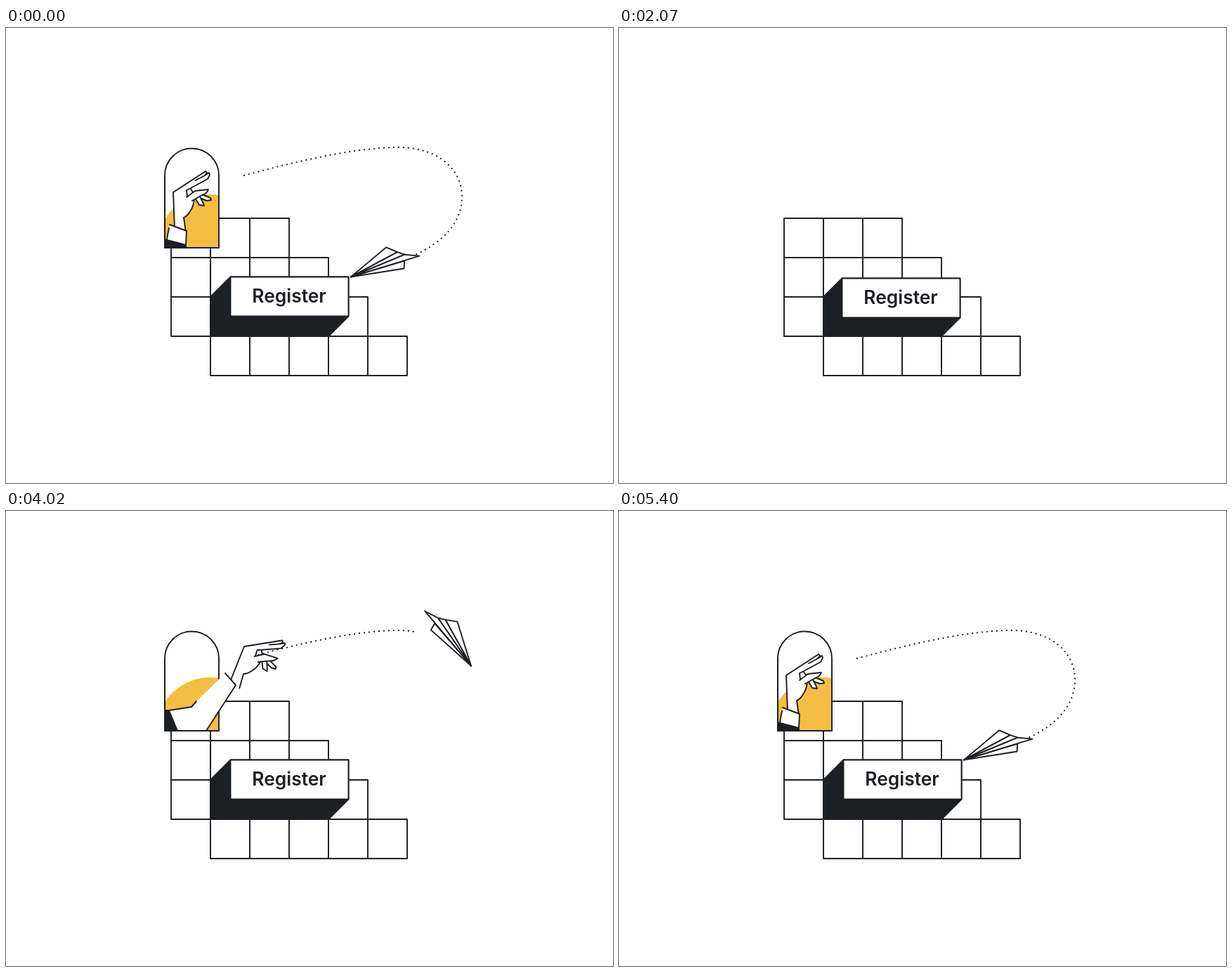
Animation, 864 px wide and 648 px high, one loop 5430 ms. Source, as an HTML page:

```html
<!DOCTYPE html>
<html lang="en">
<head>
<meta charset="utf-8">
<title>Register</title>
<style>
html, body { margin: 0; width: 100%; height: 100%; overflow: hidden; background: #fff; }
svg { display: block; width: 864px; height: 648px; }
.line { fill: #fff; stroke: #1c1f23; stroke-width: 1.9; stroke-linejoin: round; stroke-linecap: round; }
.line * { vector-effect: non-scaling-stroke; }
.bare { fill: none; }
.dark { fill: #1c1f23; }
text { font: 600 26.4px Inter, "Open Sans", sans-serif; text-anchor: middle; }
</style>
</head>
<body>
<svg viewBox="0 0 864 648">
  <defs>
    <clipPath id="inside"><path id="insideShape"/></clipPath>
    <clipPath id="reach"><path id="reachShape"/></clipPath>
  </defs>
  <g id="grid" class="line"></g>
  <g id="button">
    <path id="side" class="line dark"/>
    <g id="face">
      <rect id="front" class="line" x="291" y="383" width="168" height="56"/>
      <text id="label" x="374.6" y="419">Register</text>
    </g>
  </g>
  <g id="trail" class="dark"></g>
  <g id="scene">
    <g class="line">
      <path id="pane" stroke="none"/>
      <g clip-path="url(#inside)"><circle id="sun" cx="291" r="78" fill="#f5be42" stroke="none"/></g>
      <path id="frame" class="bare"/>
    </g>
    <g class="line" clip-path="url(#reach)">
      <g class="hand">
        <path d="M274 235L291 242L292 245L286 246L270 240Z"/>
        <path d="M268 240L275 252L282 253L281 250L276 240Z"/>
        <path d="M240 285L238 234L284 204L286 206L283 210L289 206L290 209L287 215L263 228L257 231L258 240L268 243Q267 255 262 261Q258 268 253 270L256 291"/>
        <path class="bare" d="M283 210L270 217M263 229L266 234"/>
      </g>
      <path id="coat" class="dark"/>
      <path id="sleeve"/>
    </g>
    <g id="planeClip" class="line">
      <g id="plane">
        <path d="M0 0L-71 29L-77 20Z"/>
        <path d="M0 0L-65 -10L-75 4Z"/>
        <path d="M0 0L-75 4L-82 12.5Z"/>
        <path d="M0 0L-82 12.5L-99 25Z"/>
      </g>
    </g>
    <g class="line" clip-path="url(#reach)">
      <g class="hand"><path d="M257 241L269 232L288 230Q286 236 279 238L265 246"/></g>
    </g>
    <path id="edge" class="line bare"/>
  </g>
</svg>
<script>
const LOOP = 5430, CUT = 969, BUTTON_IN = 1770, WINDOW_IN = 2500, RELEASE = 3640, LANDED = 5400;
const CELL = 56, DEPTH = 28.5;
const $ = id => document.getElementById(id);
const clamp = v => Math.min(1, Math.max(0, v));
const span = (t, a, b) => clamp((t - a) / (b - a));
const smooth = (t, a, b) => { const u = span(t, a, b); return u * u * (3 - 2 * u); };
const mix = (a, b, k) => a + (b - a) * k;
const blend = (p, q, k) => p.map((v, i) => mix(v, q[i], k));
const set = (id, attr, v) => $(id).setAttribute(attr, v);
const show = (el, on) => { el.style.display = on ? '' : 'none'; };
const poly = pts => 'M' + pts.map(p => p.join(' ')).join('L');

function rotate([x, y], deg) {
  const a = deg * Math.PI / 180, c = Math.cos(a), s = Math.sin(a);
  return [x * c - y * s, x * s + y * c];
}

function add(parent, tag, attrs) {
  const el = document.createElementNS('http://www.w3.org/2000/svg', tag);
  for (const k in attrs) el.setAttribute(k, attrs[k]);
  return parent.appendChild(el);
}

// Share of the way still to go on cubic-bezier(.17, 0, 0, 1).
function remaining(x) {
  if (x <= 0) return 1;
  if (x >= 1) return 0;
  let lo = 0, hi = 1;
  for (let i = 0; i < 24; i++) {
    const u = (lo + hi) / 2;
    if (0.51 * u * (1 - u) ** 2 + u ** 3 < x) lo = u; else hi = u;
  }
  return 1 - lo * lo * (3 - 2 * lo);
}

// Hand poses: knuckle x, y, turn.
const LOW = [172, 415, 12], HOLD = [242, 237, -9], THROWN = [339, 193, 24], REST = [238, 234, 0];

// Sleeve outline at rest (moves with the hand) and with the arm stretched out.
const sleeveRest = [[233, 280], [257, 289], [256, 309], [245, 306], [229, 302], [230, 295], [232, 285]];
const sleeveOut = [[312, 231], [327, 248], [285, 313], [244, 313], [232, 284], [264, 279], [271, 271]];

const cells = [];
[3, 4, 5, 5].forEach((count, row) => {
  const x = row === 3 ? 291 : 235, slide = [24, 18, 15, 21][row];
  for (let i = 0; i < count; i++)
    cells.push({ slide, el: add($('grid'), 'rect', { x: x + i * CELL, y: 271 + row * CELL, width: CELL, height: CELL }) });
});

const curve = document.createElementNS('http://www.w3.org/2000/svg', 'path');
curve.setAttribute('d', 'M339 210C420 188 500 170 560 170C620 171 649 205 649 240C649 280 618 308 578 325');
const curveLength = curve.getTotalLength();
const along = k => { const p = curve.getPointAtLength(curveLength * k); return [p.x, p.y]; };
const dotCount = Math.round(curveLength / 7), dots = [];
for (let i = 0; i <= dotCount; i++) {
  const [cx, cy] = along(i / dotCount);
  dots.push(add($('trail'), 'circle', { cx, cy, r: 1.15 }));
}

function drawGrid(t, slide) {
  cells.forEach((c, i) => {
    const age = t - CUT - i * 100 / 3, leaving = t < CUT;
    show(c.el, leaving || age >= 0);
    const move = leaving ? [-c.slide * slide, 0] : [0, 36.5 * remaining(age / 500)];
    c.el.setAttribute('transform', `translate(${move})`);
  });
}

function drawButton(t, x) {
  const age = t - BUTTON_IN, leaving = t < CUT;
  show($('button'), leaving || age >= 0);
  const e = leaving ? DEPTH : DEPTH * (1 - Math.exp(-age / 230) * Math.cos(age * Math.PI / 190));
  const l = 291, r = 459, top = 383, b = 439;
  set('button', 'transform', `translate(${x})`);
  set('face', 'transform', `translate(${e} ${-e})`);
  set('side', 'd', poly([[l, top], [l + e, top - e], [r + e, top - e], [r + e, b - e], [r, b], [l, b]]) + 'Z');
  const k = leaving ? span(t, 330, 450) : 0;
  $('front').style.fill = `rgb(${blend([255, 255, 255], [80, 134, 236], k)})`;
  $('label').style.fill = `rgb(${blend([28, 31, 35], [255, 255, 255], k)})`;
}

function drawWindow(T) {
  const k = remaining((T - WINDOW_IN) / 500);
  const top = 171.5 + 82 * k, b = 313 + 38 * k, s = top + 38.5;
  const arch = `M226 ${b}V${s}A38.5 38.5 0 0 1 303 ${s}V${b}Z`;
  for (const id of ['insideShape', 'pane', 'frame']) set(id, 'd', arch);
  set('reachShape', 'd', `M226 ${b}V${s}A38.5 38.5 0 0 1 264.5 ${top}V-99H900V${b}Z`);
  set('edge', 'd', `M303 ${b}H226V${s}`);
  set('sun', 'cy', 315 + 158 * k);
}

function drawArm(T, rise) {
  const reach = smooth(T, 3523, 3763), back = smooth(T, 4600, 5230), out = reach * (1 - back);
  const pose = blend(blend(blend(HOLD, LOW, rise), THROWN, reach), REST, back);
  const [x, y, turn] = pose;
  for (const el of document.querySelectorAll('.hand'))
    el.setAttribute('transform', `translate(${x} ${y}) rotate(${turn}) translate(-238 -234)`);
  const place = p => {
    const [dx, dy] = rotate([p[0] - 238, p[1] - 234], turn);
    return [x + dx, y + dy];
  };
  const pts = sleeveRest.map((p, i) => blend(place(p), sleeveOut[i], out));
  set('sleeve', 'd', poly(pts));
  const shoulder = [[256, 325], [215, 325], [215, 300]].map(place);
  set('coat', 'd', poly([pts[4], pts[3], pts[2],
    ...shoulder.map((p, i) => blend(p, [i ? 215 : 285, i < 2 ? 325 : 284], out))]) + 'Z');
  return pose;
}

// Nose x, y and turn while the plane follows the curve; it rolls over in the bend.
function flight(s, flip) {
  const ahead = Math.min(0.995, s + 0.06);
  const [x0, y0] = along(ahead - 0.005), [x1, y1] = along(ahead + 0.005);
  const heading = Math.atan2(y1 - y0, x1 - x0) * 180 / Math.PI + 5;
  const [x, y] = along(s), [dx, dy] = rotate([92, 0], heading);
  return [x + dx, y + dy, heading + 12.5 * flip + 20 * Math.sin(Math.PI * s)];
}

function drawPlane(T, s, rise, hand) {
  const tilt = 21 * rise, [dx, dy] = rotate([94, -30], tilt);
  const held = [hand[0] + dx, hand[1] + dy, tilt];
  const flip = 1 - 2 * smooth(s, 0.55, 0.76);
  const [x, y, turn] = blend(held, flight(s, flip), smooth(T, RELEASE - 20, RELEASE + 120));
  set('plane', 'transform', `translate(${x} ${y}) rotate(${turn}) scale(1 ${flip})`);
  set('planeClip', 'clip-path', T < RELEASE ? 'url(#reach)' : 'none');
}

function drawTrail(from, to) {
  dots.forEach((d, i) => show(d, to > 0 && i / dotCount <= to && i / dotCount >= from));
}

function draw(t) {
  const leaving = t < CUT, T = leaving ? LOOP : t;
  const slide = leaving ? (Math.max(0, t - 540) / 270) ** 4 : 0;
  const shift = -14.8 * slide;
  const s = 1 - (1 - span(T, RELEASE, LANDED)) ** 3.1;
  const rise = remaining((T - WINDOW_IN) / 900);
  for (const id of ['grid', 'button', 'scene']) $(id).style.opacity = leaving ? 1 - span(t, 860, 960) : 1;
  drawGrid(t, slide);
  drawButton(t, shift);
  drawTrail(leaving ? span(t, 420, 690) * 1.01 : 0, s);
  show($('scene'), T >= WINDOW_IN);
  set('scene', 'transform', `translate(${shift})`);
  drawWindow(T);
  drawPlane(T, s, rise, drawArm(T, rise));
}

const start = performance.now();
function tick() {
  draw((performance.now() - start) % LOOP);
  requestAnimationFrame(tick);
}
tick();
</script>
</body>
</html>
```
